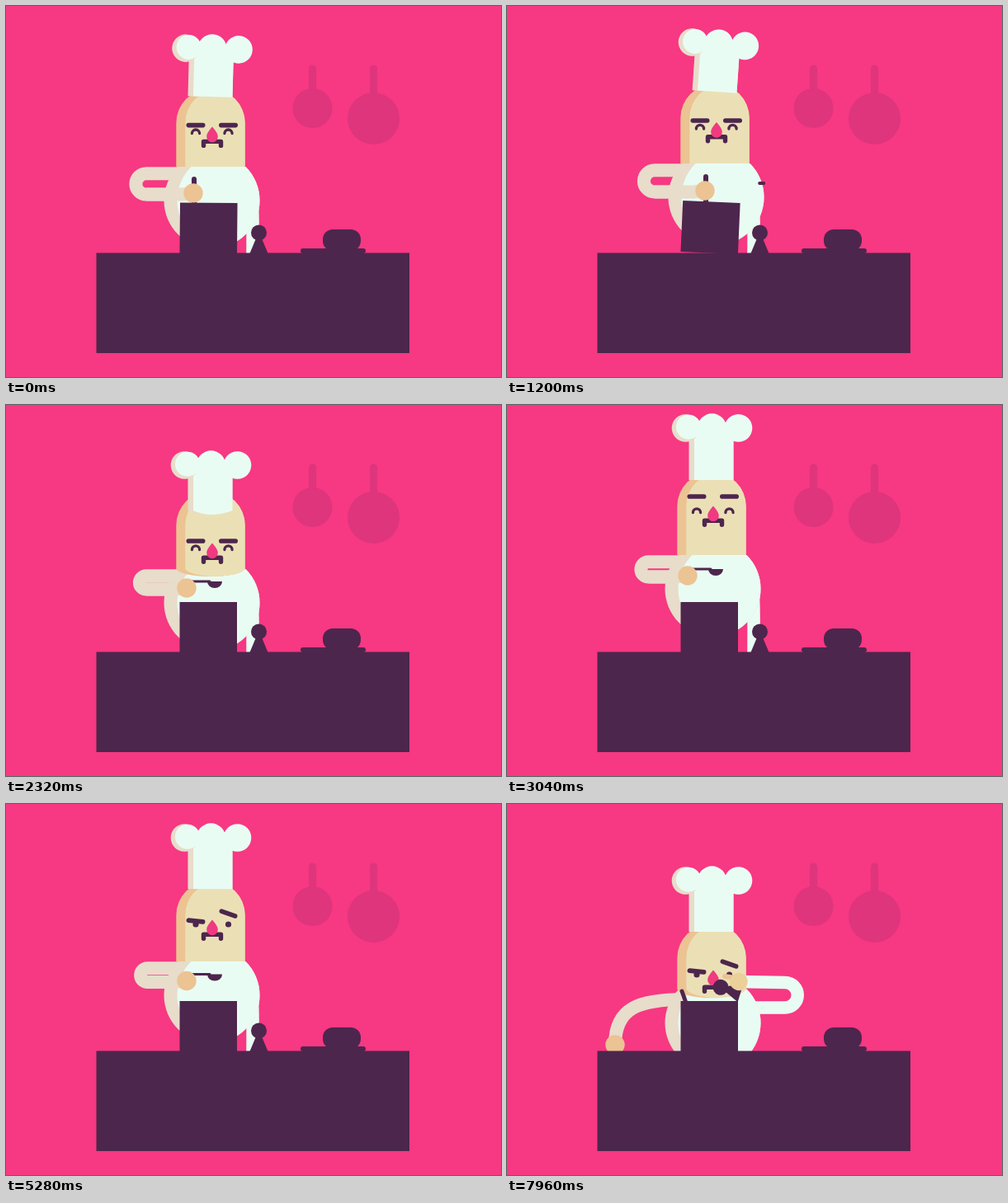
Recreate the animation shown at these times as an HTML page with a canvas. Size 600x450 px, loop 8 s.

```html
<!DOCTYPE html>
<html lang="en">
<head>
<meta charset="utf-8">
<title>Chef</title>
<style>
html, body { margin: 0; width: 100%; height: 100%; overflow: hidden; background: #f73882; }
canvas { display: block; }
</style>
</head>
<body>
<canvas id="stage" width="600" height="450"></canvas>
<script>
const g = document.getElementById('stage').getContext('2d');
const LOOP = 8000, TAU = Math.PI * 2;
const PINK = '#f73882', DARK = '#4d264d', PAN = '#de357d', WHITE = '#e9fcf3',
  SHADE = '#e8dccb', SKIN = '#ebe0b5', TAN = '#ecc392', PALM = '#ebd09a';

const mix = (a, b, u) => a + (b - a) * u;
const smooth = (a, b, t) => {
  const u = Math.min(1, Math.max(0, (t - a) / (b - a)));
  return u * u * (3 - 2 * u);
};

// Each pose keeps what the one before it does not change.
const POSES = [];
function pose(time, change) {
  POSES.push({ ...POSES[POSES.length - 1], ...change, time });
}
pose(1960, { x: 249, torso: 185, hat: 96, eye: 140, tilt: 0, bow: 0, brow: -9, hx: 222, hy: 205, elbow: 170, tall: 60, dip: 0 });
pose(2320, { x: 248, torso: 199, hat: 128, eye: 174, bow: 5, hx: 219, hy: 222, tall: 55, dip: 14 });
pose(3040, { torso: 182, hat: 91, eye: 129, bow: 0, brow: -18, hy: 207, elbow: 171.5, tall: 63, dip: 0 });
pose(3360, { torso: 181, hat: 89, eye: 127, hy: 206 });
pose(3640, { torso: 177, hat: 80, eye: 121, hy: 202, tall: 62 });
pose(4200, { torso: 191, hat: 104.5, eye: 148, hy: 214.5 });
pose(4480, { hat: 103, eye: 147 });
pose(6540, {});
pose(6640, { torso: 187, hat: 93, eye: 138, hx: 180, hy: 225 });
pose(6720, { torso: 208, hat: 128, eye: 180, bow: 2, hx: 114, hy: 262 });
pose(6800, { torso: 227, hat: 157, eye: 211, bow: 6, hx: 119, hy: 281 });
pose(6920, { torso: 223, hat: 152, eye: 208, hx: 126, hy: 288 });
pose(7360, { torso: 224.5, hat: 155, hx: 131, hy: 292 });

function stirPose(t) {
  const p = TAU * t / 800, c = Math.cos(p), s = Math.sin(p), lift = -3 * s;
  return {
    x: 250 - 2 * c, torso: 193 + 2 * c + lift * .6, hat: 107 + 3 * c + lift,
    eye: 150.3 + 2.8 * c + lift, tilt: 2.7 - 1.2 * c, bow: 0, brow: -8.5,
    hx: 233.5 - 6.5 * c, hy: 225.5 + 1.5 * c + s, elbow: 174.5 - 4.5 * c, tall: 58, dip: 0
  };
}

function blend(a, b, u) {
  const out = {};
  for (const k in a) out[k] = mix(a[k], b[k], u);
  return out;
}

function poseAt(t) {
  if (t < POSES[0].time) return blend(stirPose(t), POSES[0], smooth(1740, 1960, t));
  let i = 0;
  while (i < POSES.length - 2 && t >= POSES[i + 1].time) i++;
  const a = POSES[i], b = POSES[i + 1];
  return blend(a, b, smooth(a.time, b.time, t));
}

function disc(x, y, r, color) {
  g.fillStyle = color;
  g.beginPath();
  g.arc(x, y, r, 0, TAU);
  g.fill();
}
function box(x, y, w, h, color, r = 0) {
  g.fillStyle = color;
  g.beginPath();
  g.roundRect(x, y, w, h, r);
  g.fill();
}
function ink(w, color, cap = 'butt') {
  g.lineWidth = w;
  g.lineCap = cap;
  g.lineJoin = 'round';
  g.strokeStyle = color;
  g.stroke();
}
function line(x1, y1, x2, y2, w, color) {
  g.beginPath();
  g.moveTo(x1, y1);
  g.lineTo(x2, y2);
  ink(w, color, 'round');
}
function at(x, y, deg, paint) {
  g.save();
  g.translate(x, y);
  g.rotate(deg * Math.PI / 180);
  paint();
  g.restore();
}

function pan(x, y, r) {
  line(x, 76, x, y, 9, PAN);
  disc(x, y, r, PAN);
}

function counter() {
  box(384, 271, 46, 26, DARK, 12);
  box(357, 294, 79, 6, DARK, 3);
  box(109.5, 299.5, 379.5, 121.5, DARK);
}

function shaker(x, y, deg) {
  at(x, y, deg, () => {
    disc(0, 0, 9.5, DARK);
    g.beginPath();
    g.moveTo(-3.5, 7);
    g.lineTo(3.5, 7);
    g.lineTo(11, 25);
    g.lineTo(-11, 25);
    g.fill();
  });
}

function foldedArm(p, lowerOnly) {
  const y1 = p.torso + 8.3, y2 = Math.max(p.hy + 1.5, y1 + 16);
  const r = (y2 - y1) / 2;
  g.beginPath();
  if (lowerOnly) {
    g.moveTo(p.elbow, y2);
  } else {
    g.moveTo(222, y1);
    g.lineTo(p.elbow, y1);
    g.arc(p.elbow, y1 + r, r, -Math.PI / 2, Math.PI / 2, true);
  }
  g.lineTo(p.hx - 14, y2);
  g.lineTo(p.hx - 2, p.hy);
  ink(16, SHADE);
}

function leaningArm(p) {
  const y = p.torso + 12.5;
  g.beginPath();
  g.moveTo(216, y);
  g.bezierCurveTo(160, y, p.hx, y + 10, p.hx, p.hy);
  ink(16, SHADE);
}

function rightArm(p, t, hand) {
  g.beginPath();
  if (t < 6720) {
    const u = smooth(6590, 6720, t), y = p.torso + mix(8, 23, u);
    g.moveTo(mix(265, 285, u), y);
    g.bezierCurveTo(mix(303, 450, u), y, mix(299, 450, u), p.torso + mix(30, 0, u), hand.x, hand.y);
  } else {
    const elbow = mix(393, 337, smooth(6700, 6900, t)), low = 247, up = hand.y + 1;
    g.moveTo(280, low);
    g.lineTo(elbow, low);
    g.arc(elbow, (low + up) / 2, (low - up) / 2, Math.PI / 2, -Math.PI / 2, true);
    g.lineTo(hand.x, hand.y);
  }
  ink(15.5, WHITE);
}

function torso(p) {
  const x = p.x + 1.5, y = p.torso + 41;
  g.save();
  g.beginPath();
  g.rect(180, p.torso, 140, 150);
  g.clip();
  disc(x, y, 58, SHADE);
  g.clip();
  disc(x + 16, y, 58, WHITE);
  g.restore();
}

function headPath(p, shift) {
  const mid = p.x + shift, r = 41.7, chin = p.torso + p.bow * 2.4;
  g.beginPath();
  g.moveTo(mid - r, p.torso);
  g.arc(mid, p.hat + 32 - p.dip, r, Math.PI, 0);
  g.lineTo(mid + r, p.torso);
  g.bezierCurveTo(mid + r - 8, chin, mid - r + 8, chin, mid - r, p.torso);
}

function head(p) {
  g.save();
  headPath(p, 0);
  g.fillStyle = TAN;
  g.fill();
  g.clip();
  headPath(p, 11);
  g.fillStyle = SKIN;
  g.fill();
  g.restore();
}

function hat(p, rim) {
  at(p.x, p.hat, p.tilt, () => {
    const y = -p.tall;
    const column = (left, color) => {
      g.fillStyle = color;
      g.beginPath();
      g.moveTo(left, y);
      g.lineTo(26.5, y);
      g.lineTo(26.5, 0);
      g.quadraticCurveTo(0, rim * 2, left, 0);
      g.fill();
    };
    column(-27.5, SHADE);
    column(-21, WHITE);
    disc(-31.5, y, 16.8, SHADE);
    disc(-28, y - 1.3, 15, WHITE);
    disc(.5, y, 17.7, WHITE);
    disc(32.5, y, 16.8, WHITE);
  });
}

function blink(a, b, t) {
  return t > a && t < b ? .85 * Math.sin(Math.PI * (t - a) / (b - a)) : 0;
}

function eye(x, y, t) {
  g.beginPath();
  if (t < 4240) {
    g.arc(x, y + 1.5, 4.6, Math.PI, 0);
    ink(3.3, DARK, 'round');
  } else {
    const open = 1 - blink(4620, 4840, t) - blink(6340, 6420, t);
    g.fillStyle = DARK;
    g.ellipse(x, y - 1, 3.6, 3.6 * open, 0, 0, TAU);
    g.fill();
  }
}

function face(p, t) {
  const x = p.x + 2, y = p.eye, doubt = smooth(5080, 5280, t);
  const brow = (bx, dy, deg) => at(bx, y + mix(p.brow, dy, doubt), deg * doubt,
    () => line(-8.7, 0, 8.7, 0, 5.6, DARK));
  eye(x - 20, y, t);
  eye(x + 19.5, y, t);
  brow(x - 20, -5, 6);
  brow(x + 19.5, -14, 20);

  // moustache
  const m = y + 11.3 + 3 * smooth(6700, 6900, t);
  g.beginPath();
  g.moveTo(x - 10.5, m + 5);
  g.lineTo(x - 10.5, m);
  g.lineTo(x + 10.5, m);
  g.lineTo(x + 10.5, m + 5);
  ink(5.4, DARK, 'round');

  // nose
  g.fillStyle = '#f03a81';
  g.beginPath();
  g.moveTo(x, y - 6.5);
  g.bezierCurveTo(x + 3, y - 3, x + 6.8, y + 1, x + 6.8, y + 5.5);
  g.arc(x, y + 5.5, 6.8, 0, Math.PI);
  g.bezierCurveTo(x - 6.8, y + 1, x - 3, y - 3, x, y - 6.5);
  g.fill();
}

function spoon(p, t) {
  const u = smooth(1800, 2140, t);
  at(p.hx + 1 - u, p.hy - 8 * u, -90 * u, () => {
    line(0, -17 * (1 - u), 0, 28, mix(6, 3, u), DARK);
    g.fillStyle = DARK;
    g.beginPath();
    g.ellipse(0, 34, 8, 9, 0, -Math.PI / 2, Math.PI / 2, true);
    g.fill();
  });
}

function drop(t, start, x, reach, last) {
  const u = (t % 800 - start) / 400, k = (u - .75) / .75;
  if (t > 1900 || u < 0 || u > last) return;
  const deg = Math.atan2(66 * k, reach) * 360 / TAU;
  at(x + reach * u, 240 - 25 * (1 - k * k), deg, () => line(-2.5, 0, 2.5, 0, 4, DARK));
}

function pot(t) {
  const rock = (1.5 - Math.cos(TAU * t / 800)) * (1 - smooth(1740, 1920, t));
  at(280, 299.5, rock, () => box(-69.5, -60.5, 69.5, 62, DARK));
}

function draw(t) {
  const p = poseAt(t), dropped = t >= 6620, grab = smooth(6600, 6740, t);
  const swing = Math.sin(Math.PI * grab);
  const hand = {
    x: mix(299, 281, grab) + 60 * swing,
    y: mix(312, 214, grab) + 1.5 * smooth(6920, 7360, t)
  };
  box(0, 0, 600, 450, PINK);
  pan(371.5, 124, 24);
  pan(445.5, 136.5, 31.5);

  if (dropped) leaningArm(p);
  else foldedArm(p, false);
  rightArm(p, t, hand);
  torso(p);
  head(p);
  hat(p, t < 6000 ? p.bow : 0);
  face(p, t);

  drop(t, 100, 250, 78, .88);
  drop(t, 300, 222, -40, 1);
  if (dropped) {
    line(212, 227, 218, 244, 5, DARK);
  } else {
    foldedArm(p, true);
    spoon(p, t);
  }
  disc(p.hx, p.hy, 11.7, TAN);
  pot(t);

  const wob = Math.sin(TAU * (t - 6920) / 320) * smooth(6920, 7100, t);
  if (grab > .8) line(264, 209, 276, 211, 6, TAN);
  shaker(mix(306.5, 259, grab) + 50 * swing, mix(275, 220.5, grab) + wob * 1.8, -76 * grab + wob * 3);
  if (grab > 0) disc(hand.x, hand.y, 10.7, PALM);
  counter();
}

function tick() {
  draw(performance.now() % LOOP);
  requestAnimationFrame(tick);
}
tick();
</script>
</body>
</html>
```
